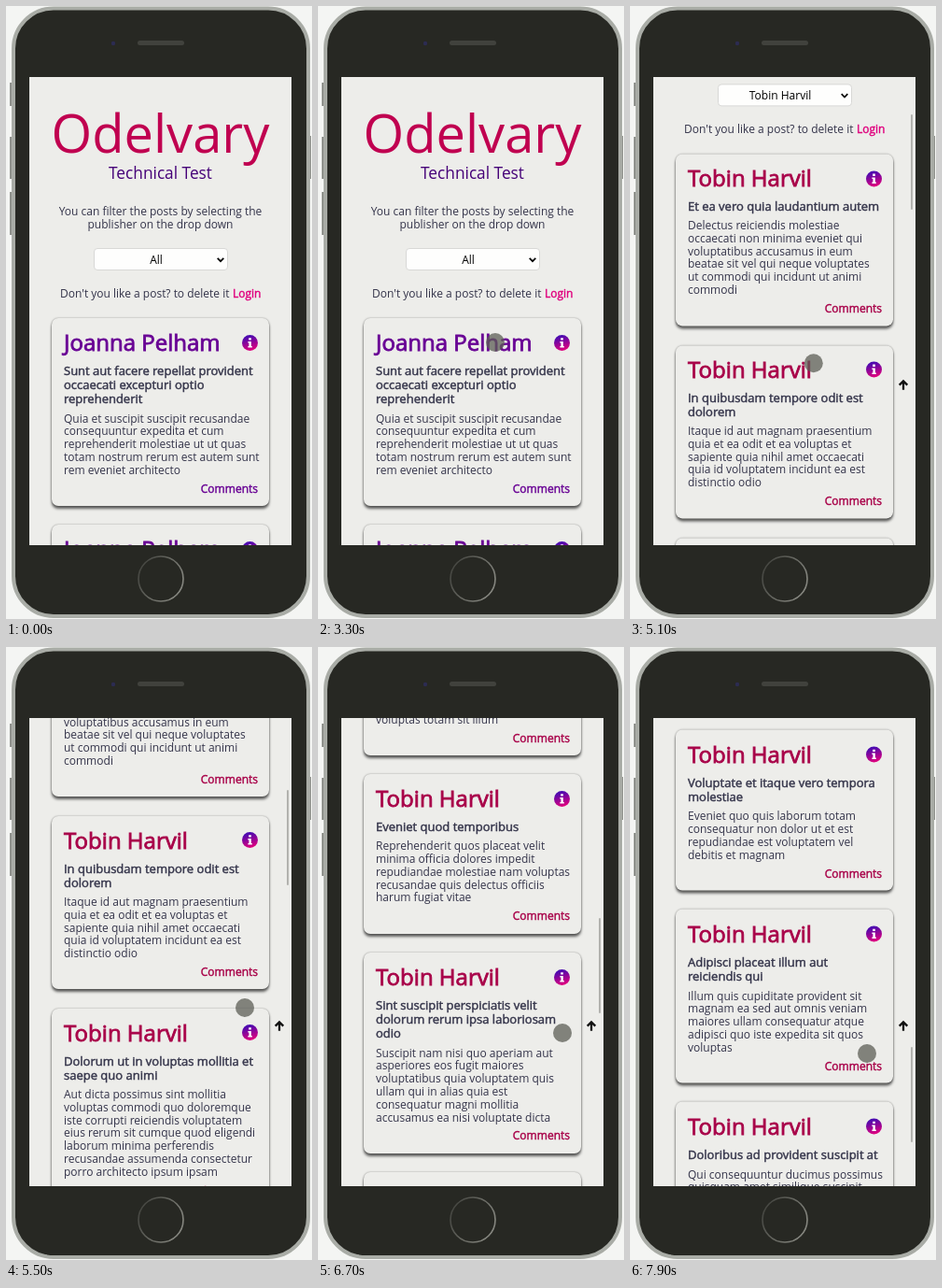
An HTML page for the animation above (8 s loop, 328x656 px).

```html
<!DOCTYPE html>
<html lang="en">
<head>
<meta charset="utf-8">
<title>Post filter on a phone</title>
<style>
  html, body { margin: 0; width: 100%; height: 100%; overflow: hidden; background: #f4f5f3; }
  body { position: relative; font: 12px/13.8px "Open Sans", "Noto Sans", sans-serif; color: #34344a; white-space: pre; }
  body > *, .page > *, .screen > * { position: absolute; }
  svg { display: block; overflow: visible; }
  .phone { left: 0; top: 0; }
  .screen { left: 25px; top: 76px; width: 281px; height: 501px; overflow: hidden; background: #ededea; }
  /* The page uses stage coordinates. */
  .page { left: -25px; top: -76px; width: 328px; }
  .center { left: 25px; width: 281px; text-align: center; }
  .brand { top: 105px; font-size: 56px; line-height: 60px; color: #c00050; }
  .subtitle { top: 169px; font-size: 17.3px; line-height: 20px; color: #450078; }
  .intro { top: 213px; line-height: 14px; }
  .bold { -webkit-text-stroke: .035em; }
  .select { left: 94px; top: 259px; width: 132px; height: 22px; padding-right: 10px; border: 1px solid #d8d8d6;
    border-radius: 4px; background: #fefefd; color: #000; line-height: 23px; text-align: center; }
  .select svg { position: absolute; right: 3px; top: 9px; }
  .list { left: 49px; top: 334px; width: 233px; }
  .card { position: relative; box-sizing: border-box; margin-bottom: 20.4px; padding: 12px 13px 11.4px; border-radius: 7px;
    background: #ededea; box-shadow: 0 0 2px #0006, 0 3px 3px #0009; }
  .name { font-size: 24px; line-height: 28px; }
  .head { margin: 8.9px 0 6px; font-size: 13px; line-height: 15.2px; }
  .comments { margin: 6.2px -1px 0 0; text-align: right; }
  .info { position: absolute; left: 203.5px; top: 17.5px; }
  .bar { left: 276px; width: 2px; height: 102px; background: #b2b2ae; border-radius: 1px; }
  .up { left: 263px; top: 324px; }
  .popup { left: 94px; top: 283px; width: 190px; height: 352px; border: 1px solid #9a9a98; background: #fefefc;
    box-shadow: 0 2px 9px #0006; font-size: 15.8px; line-height: 32px; }
  .popup div { padding-left: 4px; }
  .popup div:first-child { background: #aee2f1; }
  .dot { width: 20px; height: 20px; margin: -10px; border-radius: 50%; background: rgba(92, 93, 86, .75); }
  .dot, .arrow { left: 0; top: 0; }
</style>
</head>
<body>
<svg class="phone" width="328" height="656">
  <defs>
    <linearGradient id="ring" x1="0" y1="0" x2="1" y2=".5"><stop stop-color="#3c3d38"/><stop offset="1" stop-color="#85867f"/></linearGradient>
    <linearGradient id="badge" x1=".3" y1="0" x2=".6" y2="1"><stop offset=".1" stop-color="#4a0ab0"/><stop offset="1" stop-color="#e6007c"/></linearGradient>
  </defs>
  <path d="M5.5 82V107M5.5 140V185M5.5 199V245M325.5 139V185" stroke="#8f918c" stroke-width="3"/>
  <rect x="8" y="2.5" width="316" height="650.5" rx="43" fill="#272823" stroke="#a9aca6" stroke-width="4"/>
  <rect x="141" y="37" width="50" height="5" rx="2.5" fill="#41423d"/>
  <circle cx="115" cy="40" r="2.2" fill="#2c2c52"/>
  <circle cx="166" cy="613" r="24" fill="none" stroke="url(#ring)" stroke-width="1.6"/>
</svg>

<div class="screen">
  <div class="page">
    <div class="center brand">Odelvary</div>
    <div class="center subtitle">Technical Test</div>
    <div class="center intro">You can filter the posts by selecting the
publisher on the drop down</div>
    <div class="select"><span></span><svg width="8" height="6"><path d="M.7 .8 4 4.2 7.3 .8" fill="none" stroke="#000" stroke-width="1.7"/></svg></div>
    <div style="left:58px;top:301px">Don't you like a post? to delete it</div>
    <div class="bold" style="left:243px;top:301px;color:#e0007e">Login</div>
    <div class="list" id="all"></div>
    <div class="list" id="filtered"></div>
  </div>
  <div class="bar"></div>
  <svg class="up" width="10" height="11"><path d="M5 10.8V1.6M.7 5.6 5 1.4 9.3 5.6" fill="none" stroke="#111" stroke-width="2.3"/></svg>
</div>

<div class="popup"></div>
<div class="dot"></div>
<svg class="arrow" width="12" height="20"><path d="M0 0V16.5L4 13 6.6 19.3 9.4 18.1 6.8 12H12Z" fill="#222" stroke="#fff"/></svg>

<script>
const $ = selector => document.querySelector(selector);
const LOOP = 8000, STEP = 100;

const publishers = [
  ["All", "#fff"], ["Joanna Pelham", "#5c469c"], ["Tobin Harvil", "#9c2257"], ["Josephine Harnel", "#93705f"],
  ["Veronica Tolbeck", "#a9a13c"], ["Lindsey Wolfrath", "#8a7426"], ["Mrs. Martin Grunwalt", "#3f5a22"],
  ["Marlon Feldkamp", "#4aa396"], ["Frederik Tollefstrande V", "#ad7a4e"], ["Sienna Holbrand", "#5333b4"],
  ["Evangelina DeMoret", "#414141"]
];

// Each post is a heading and a body; "/" breaks a line.
const firstPosts = [
  ["Sunt aut facere repellat provident/occaecati excepturi optio/reprehenderit",
   "Quia et suscipit suscipit recusandae/consequuntur expedita et cum/reprehenderit molestiae ut ut quas/totam nostrum rerum est autem sunt/rem eveniet architecto"],
  ["Qui est esse", "Est rerum tempore vitae sequi sint"]
];
const filteredPosts = [
  ["Et ea vero quia laudantium autem",
   "Delectus reiciendis molestiae/occaecati non minima eveniet qui/voluptatibus accusamus in eum/beatae sit vel qui neque voluptates/ut commodi qui incidunt ut animi/commodi"],
  ["In quibusdam tempore odit est/dolorem",
   "Itaque id aut magnam praesentium/quia et ea odit et ea voluptas et/sapiente quia nihil amet occaecati/quia id voluptatem incidunt ea est/distinctio odio"],
  ["Dolorum ut in voluptas mollitia et/saepe quo animi",
   "Aut dicta possimus sint mollitia/voluptas commodi quo doloremque/iste corrupti reiciendis voluptatem/eius rerum sit cumque quod eligendi/laborum minima perferendis/recusandae assumenda consectetur/porro architecto ipsum ipsam"],
  ["Voluptatem eligendi optio",
   "Fuga et accusamus dolorum/perferendis illo voluptas non/doloremque neque facere ad qui/dolorum molestiae beatae sed aut/voluptas totam sit illum"],
  ["Eveniet quod temporibus",
   "Reprehenderit quos placeat velit/minima officia dolores impedit/repudiandae molestiae nam voluptas/recusandae quis delectus officiis/harum fugiat vitae"],
  ["Sint suscipit perspiciatis velit/dolorum rerum ipsa laboriosam/odio",
   "Suscipit nam nisi quo aperiam aut/asperiores eos fugit maiores/voluptatibus quia voluptatem quis/ullam qui in alias quia est/consequatur magni mollitia/accusamus ea nisi voluptate dicta"],
  ["Fugit voluptas sed molestias/voluptatem provident",
   "Eos voluptas et aut odit natus/earum aspernatur fuga molestiae/ullam deserunt ratione qui eos qui/nihil ratione nemo velit ut aut id/quo"],
  ["Voluptate et itaque vero tempora/molestiae",
   "Eveniet quo quis laborum totam/consequatur non dolor ut et est/repudiandae est voluptatem vel/debitis et magnam"],
  ["Adipisci placeat illum aut/reiciendis qui",
   "Illum quis cupiditate provident sit/magnam ea sed aut omnis veniam/maiores ullam consequatur atque/adipisci quo iste expedita sit quos/voluptas"],
  ["Doloribus ad provident suscipit at",
   "Qui consequuntur ducimus possimus/quisquam amet similique suscipit/porro ipsam amet eos veritatis/officiis exercitationem vel fugit"]
];

const lines = text => text.replaceAll("/", "\n");
const card = (name, color, [head, body]) => `<div class="card"><div class="name bold" style="color:${color}">${name}</div>` +
  `<svg class="info" width="17" height="17"><circle cx="8.5" cy="8.5" r="8.5" fill="url(#badge)"/>` +
  `<path d="M7.2 3.2h2.6v2.3H7.2ZM6.4 7h3.4v5h1v1.6H6.4V12h1V8.5h-1Z" fill="#fff"/></svg>` +
  `<div class="head bold">${lines(head)}</div><div>${lines(body)}</div>` +
  `<div class="comments bold" style="color:${color}">Comments</div></div>`;
const fill = (selector, posts, name, color) => $(selector).innerHTML = posts.map(post => card(name, color, post)).join("");

fill("#all", firstPosts, publishers[1][0], "#680094");
fill("#filtered", filteredPosts, publishers[2][0], "#a80048");
$(".popup").innerHTML = publishers.map(([name, color]) => `<div style="color:${color}">${name}</div>`).join("");

// Keys are [time, ...values], joined by straight lines.
const scrollKeys = [[4500, 0], [4800, 130], [5000, 130], [5500, 358], [5700, 460], [5800, 460],
  [6100, 660], [6700, 1033], [7500, 1530], [7600, 1530], [7900, 1712.5]];
const pointerKeys = [[1100, 314, 258], [1200, 283, 267], [1400, 239, 272], [1500, 239, 272], [1600, 239, 265],
  [2100, 192, 325], [2200, 192, 325], [2300, 184, 343], [2400, 179, 356], [3200, 179, 356], [3300, 190, 360],
  [3600, 190, 360], [3700, 173, 357], [3800, 173, 357], [4000, 196, 386], [4200, 177, 381], [5000, 177, 381],
  [5400, 256, 386], [5800, 256, 386], [6100, 259, 396], [6700, 262, 413], [7500, 256, 430], [7600, 256, 430], [7900, 254, 435]];

const clamp = value => Math.min(1, Math.max(0, value));
function sample(keys, time) {
  const next = keys.findIndex(key => key[0] > time);
  if (next === 0) return keys[0].slice(1);
  if (next < 0) return keys.at(-1).slice(1);
  const from = keys[next - 1], to = keys[next], part = (time - from[0]) / (to[0] - from[0]);
  return from.slice(1).map((value, i) => value + (to[i + 1] - value) * part);
}
const show = (selector, on) => $(selector).style.display = on ? "" : "none";

function draw(now) {
  const time = Math.floor(now % LOOP / STEP) * STEP;
  const [scroll] = sample(scrollKeys, time);
  const [x, y] = sample(pointerKeys, time);
  const filtered = time >= 3500;
  const arrow = time < 1200 || (time >= 1600 && time < 3300);

  $(".select span").textContent = publishers[filtered ? 2 : 0][0];
  show("#all", !filtered);
  show("#filtered", filtered);
  $(".page").style.transform = `translateY(${-scroll}px)`;
  $(".bar").style.top = 4 + scroll * .203 + "px";
  show(".bar", scroll > 0);
  show(".up", scroll > 100);

  $(".popup").style.opacity = Math.min(clamp((time - 1500) / 200), clamp((3300 - time) / 200));
  show(".arrow", time >= 1100 && arrow);
  show(".dot", time >= 1100 && !arrow);
  $(".arrow").style.transform = $(".dot").style.transform = `translate(${x}px, ${y}px)`;
}

function tick() {
  draw(performance.now());
  requestAnimationFrame(tick);
}
tick();
</script>
</body>
</html>
```
